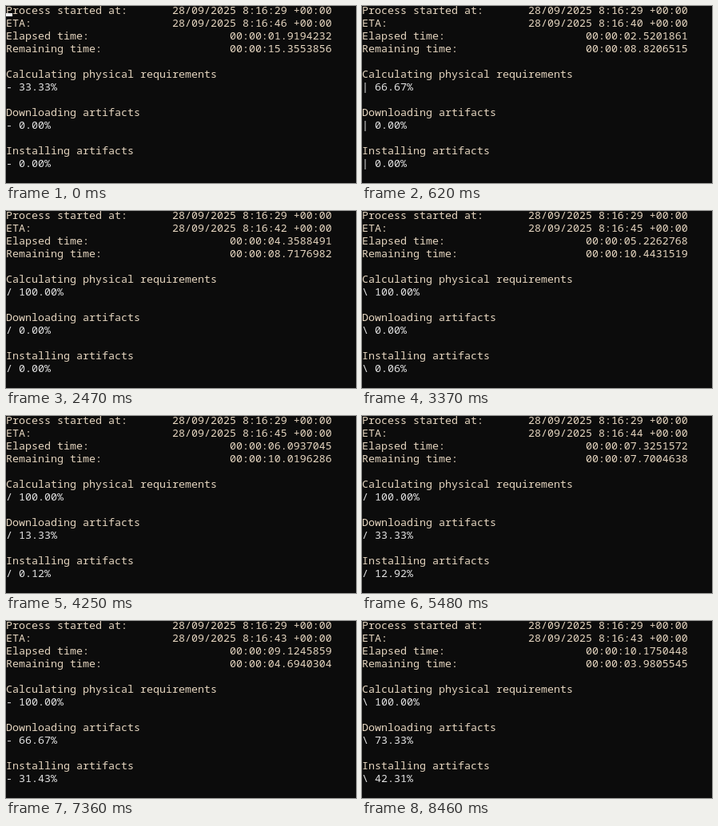
Recreate the animation shown at these times as an HTML page. Size 438 px wide and 222 px high, loop 8.53 s.

```html
<!DOCTYPE html>
<html lang="en">
<head>
<meta charset="utf-8">
<title>Progress in a console</title>
<style>
  html, body { margin: 0; width: 100%; height: 100%; overflow: hidden; background: #0c0c0c; }
  svg { display: block; width: 438px; height: 222px; }
  text {
    font: 13.3333px "Noto Sans Mono", "DejaVu Sans Mono", monospace;
    fill: #e6d6c0;
    white-space: pre;
  }
  text.state { fill: #e2e2e2; }
</style>
</head>
<body>
<svg id="screen" viewBox="0 0 438 222">
  <rect id="cursor" x="0" y="9" width="8" height="4" fill="#f2f2f2"/>
</svg>
<script>
const LOOP = 8530, REFRESH = 69;
const CELL = 16, BASELINE = 10, COLUMNS = 51;
const START_SECOND = 29.4;
const SPINNER = "|/-\\", SPIN_STEP = 0.062;
const BLINK = 475, BLINK_SHIFT = 420;

// Key points: time in ms, elapsed seconds, installed share
const keys = [
  [0, 1.9194232, 0],
  [1290, 3.1877005, 0],
  [2470, 4.3588491, 0],
  [4250, 6.0937045, 0.0012],
  [5480, 7.3251572, 0.1292],
  [7360, 9.1245859, 4.714 / 15],
  [8460, 10.1750448, 6.346 / 15],
  [LOOP, 10.24, 0.43]
];

// Interpolates between key points in whole screen refreshes.
function sample(now) {
  const i = keys.findIndex(key => key[0] > now);
  const from = keys[i - 1], to = keys[i];
  const steps = Math.round((to[0] - from[0]) / REFRESH);
  const part = Math.floor((now - from[0]) / (to[0] - from[0]) * steps) / steps;
  return from.map((value, k) => value + (to[k] - value) * part);
}

const calculated = elapsed => Math.min(3, Math.floor(elapsed / 1.25)) / 3;

function downloaded(elapsed) {
  const u = Math.min(1, Math.max(0, (elapsed - 4.4) / 5.8));
  return Math.floor(11.5 * (1 - Math.cos(Math.PI * u)) / 2) / 15;
}

const field = (label, value) => label + value.padStart(COLUMNS - label.length);
const date = second => `28/09/2025 8:16:${Math.floor(second)} +00:00`;
const span = seconds => "00:00:" + seconds.toFixed(7).padStart(10, "0");

const screen = document.getElementById("screen");
const cursor = document.getElementById("cursor");
const rows = Array.from({ length: 13 }, (_, i) => {
  const row = document.createElementNS("http://www.w3.org/2000/svg", "text");
  row.setAttribute("x", 0);
  row.setAttribute("y", BASELINE + i * CELL);
  if (i > 5 && i % 3 === 0) row.setAttribute("class", "state");
  screen.insertBefore(row, cursor);
  return row;
});

function draw(now) {
  const [time, elapsed, installed] = sample(now);
  const tasks = [
    ["Calculating physical requirements", calculated(elapsed)],
    ["Downloading artifacts", downloaded(elapsed)],
    ["Installing artifacts", installed]
  ];
  const total = tasks.reduce((sum, task) => sum + task[1], 0) / tasks.length;
  const remaining = elapsed * (1 / total - 1);
  const spin = SPINNER[Math.floor(elapsed / SPIN_STEP - 0.6) % 4];

  const lines = [
    field("Process started at:", date(START_SECOND)),
    field("ETA:", date(START_SECOND + elapsed + remaining)),
    field("Elapsed time:", span(elapsed)),
    field("Remaining time:", span(remaining)),
    ...tasks.flatMap(([name, share]) => ["", name, `${spin} ${(share * 100).toFixed(2)}%`])
  ];
  lines.forEach((line, i) => { rows[i].textContent = line; });

  const toggles = Math.floor((time - BLINK_SHIFT) / BLINK) + 1;
  cursor.style.visibility = toggles % 2 ? "hidden" : "visible";
}

const origin = performance.now();
function tick() {
  draw((performance.now() - origin) % LOOP);
  requestAnimationFrame(tick);
}
tick();
</script>
</body>
</html>
```
